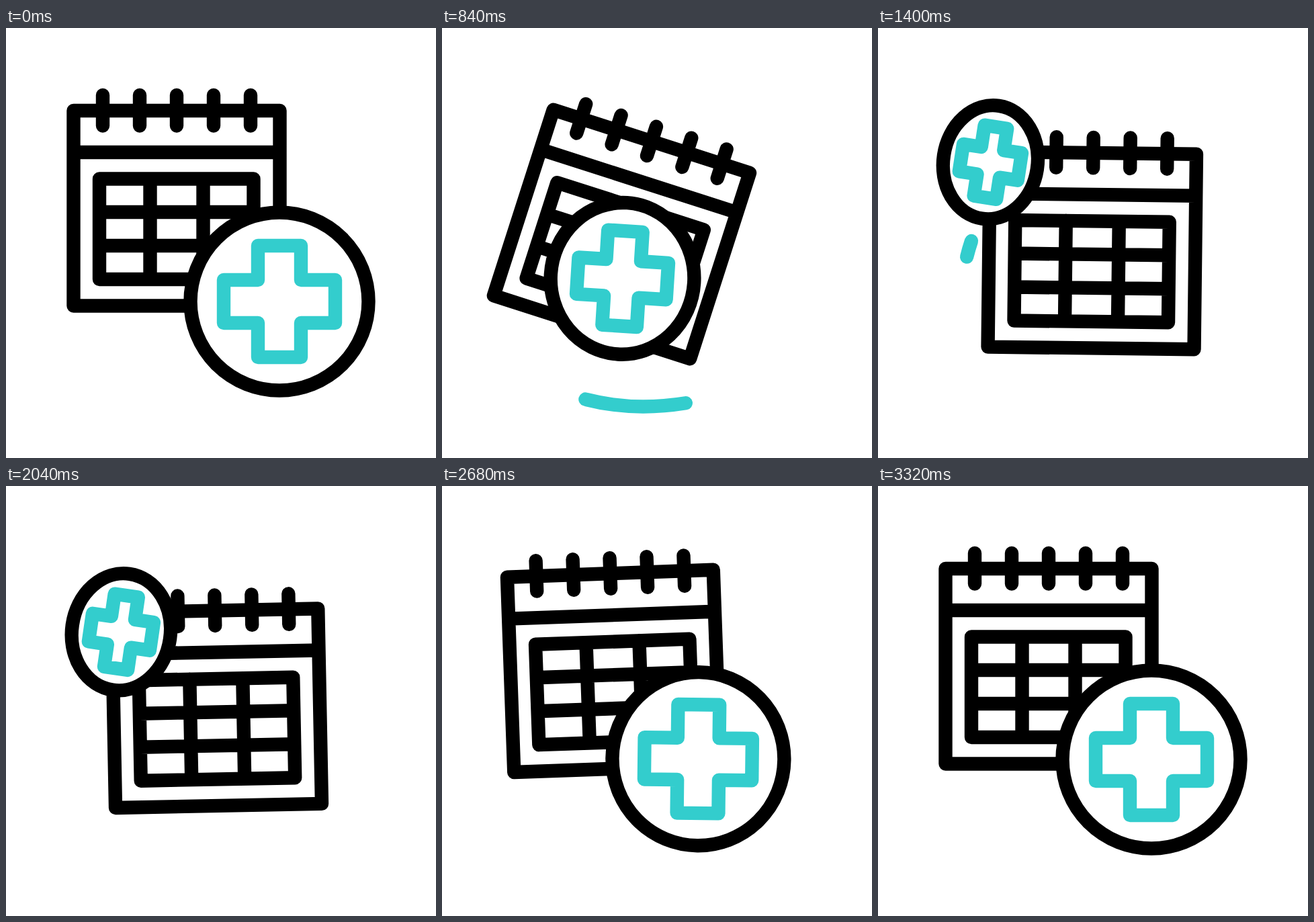
These frames come from a looping animation (640 px wide and 640 px high, 3.6 s). An HTML page:

```html
<!DOCTYPE html>
<html>
<head>
<meta charset="utf-8">
<style>
html, body { margin: 0; height: 100%; overflow: hidden; background: #fff; }
svg { display: block; width: 640px; height: 640px; }
svg * { fill: none; stroke: #000; stroke-width: 20.4; stroke-linecap: round; stroke-linejoin: round; vector-effect: non-scaling-stroke; }
svg .teal { stroke: #33cdcd; }
svg circle { fill: #fff; }
</style>
</head>
<body>
<svg viewBox="0 0 640 640">
  <defs>
    <path id="calendarRoute" d="M254 268C262 309 275 328 320 331"/>
    <path id="badgeRoute" d="M407 407C243.500 407 190.500 312 166.500 195.500"/>
  </defs>
  <path id="trail" class="teal" style="vector-effect:none" pathLength="1" d="M364 558Q285 571 215 553C125 528 105 420 139 317"/>
  <g id="calendar">
    <path d="M-153.500 -145h307v290.500h-307zM-153.500 -83h307"/>
    <path d="M-115 -43.500h229.500v149.500h-229.500zM-39.500 -43.500v149.500M39.500 -43.500v149.500M-115 6h229.500M-115 56h229.500"/>
    <path d="M-110 -168v45.500m55 -45.500v45.500m55 -45.500v45.500m55 -45.500v45.500m55 -45.500v45.500"/>
  </g>
  <g id="badge">
    <circle r="132.500"/>
    <path class="teal" d="M-32 -83h64v51h51v64h-51v51h-64v-51h-51v-64h51z"/>
  </g>
</svg>
<script>
const LOOP = 3600;
const [trail, calendar, badge, calendarRoute, badgeRoute] =
  ['trail', 'calendar', 'badge', 'calendarRoute', 'badgeRoute'].map(id => document.getElementById(id));

// Progress from 0 to 1 between two times, eased like cubic-bezier(x1, 0, x2, 1).
function ease(t, from, to, x1 = 1 / 3, x2 = 2 / 3) {
  const x = Math.min(1, Math.max(0, (t - from) / (to - from)));
  if (x === 0 || x === 1) return x;
  let low = 0, high = 1;
  for (let i = 0; i < 30; i++) {
    const s = (low + high) / 2, r = 1 - s;
    if (3 * x1 * s * r * r + 3 * x2 * s * s * r + s ** 3 < x) low = s;
    else high = s;
  }
  return low * low * (3 - 2 * low);
}

// Puts a group at a fraction of its route, then turns and scales it.
function place(group, route, fraction, turn, scale = '1') {
  const { x, y } = route.getPointAtLength(route.getTotalLength() * fraction);
  group.setAttribute('transform', `translate(${x} ${y}) rotate(${turn}) scale(${scale})`);
}

function draw(t) {
  const travel = ease(t, 340, 1570, .6, .23) - ease(t, 1702, 3262, .65, 0);
  const tilt = 18 * (ease(t, 340, 800, .7, .7) - ease(t, 800, 1480))
    - 2.6 * (ease(t, 1742, 2400) - ease(t, 2400, 3333));
  place(calendar, calendarRoute, travel, tilt);
  place(badge, badgeRoute, travel, 8.8 * travel, `${1 - .476 * travel} ${1 - .364 * travel}`);

  const head = ease(t, 600, 1200), tail = ease(t, 820, 1500);
  trail.style.display = head > tail ? '' : 'none';
  trail.setAttribute('stroke-dasharray', `${head - tail} 2`);
  trail.setAttribute('stroke-dashoffset', -tail);
}

function tick() {
  draw(performance.now() % LOOP);
  requestAnimationFrame(tick);
}
tick();
</script>
</body>
</html>
```
